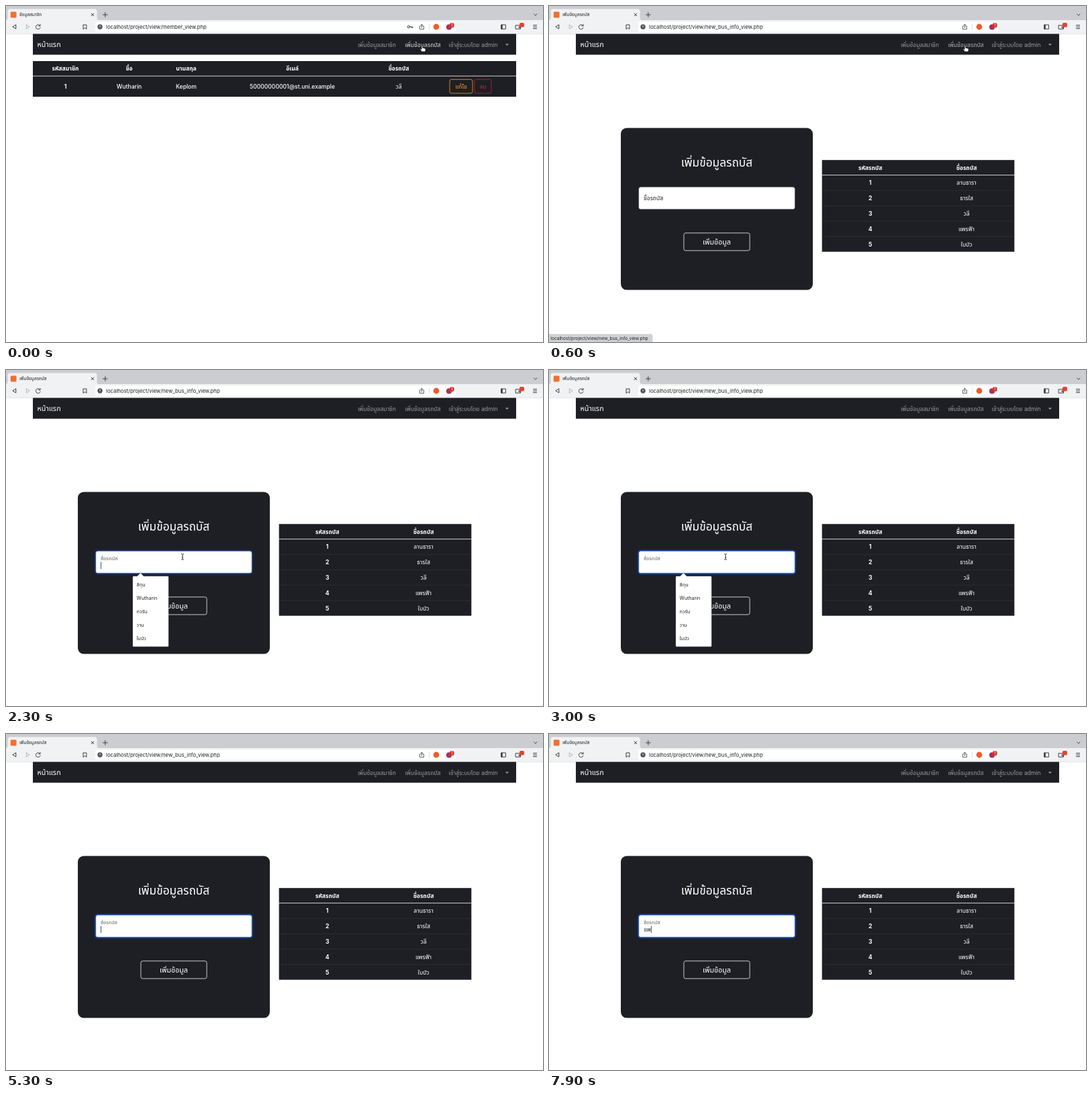
Write an HTML page that moves like this. It is 800 px wide and 500 px high and loops after 8 s.

```html
<!DOCTYPE html>
<html lang="th">
<head>
<meta charset="utf-8">
<style>
html, body { margin: 0; width: 100%; height: 100%; overflow: hidden; background: #fff }
svg { display: block; width: 800px; height: 500px }
text { font: 8.6px Inter, "Noto Sans Thai Looped", "Noto Sans Thai", "Noto Sans", sans-serif; fill: #fff; white-space: pre }
.mid { text-anchor: middle }
.bold { font-weight: 700 }
.medium { font-weight: 500 }
.dark { fill: #212225 }
.small { font-size: 6.6px }
.panel { fill: #1e1f24 }
.icon { fill: none; stroke: #3c3e43; stroke-width: 1; stroke-linecap: round; stroke-linejoin: round }
</style>
</head>
<body>
<svg viewBox="0 0 800 500">
  <defs>
    <linearGradient id="fade"><stop stop-color="#f1f2f4" stop-opacity="0"/><stop offset="1" stop-color="#f1f2f4"/></linearGradient>
  </defs>

  <!-- browser window -->
  <rect width="800" height="21" fill="#cccdd1"/>
  <rect y="21" width="800" height="20.5" fill="#f1f2f4"/>
  <path d="M0 21q2.5 0 2.5-3V8q0-3.5 3.5-3.5H132q3.5 0 3.5 3.5v10q0 3 3 3z" fill="#f1f2f4"/>
  <rect x="133" y="23.5" width="537" height="15" rx="2.5" fill="#fff"/>
  <path d="M0 41.5H800" stroke="#dcdde0" stroke-width=".7"/>
  <rect id="favicon" x="6.8" y="8.6" width="8.8" height="8.8" rx="1.5" fill="#ee7130"/>
  <path id="spinner" class="icon" d="M9 10.2a3.6 3.6 0 0 1 2-.9" opacity=".25"/>
  <text id="title" class="small medium dark" x="20" y="15.2"></text>
  <rect x="108" y="6" width="15" height="14" fill="url(#fade)"/>
  <rect x="123" y="6" width="11" height="14" fill="#f1f2f4"/>
  <g class="icon">
    <path d="M127 11l3.8 3.8m0-3.8l-3.8 3.8M144.5 13h6.6m-3.3-3.3v6.6M786.6 12l2.2 2.2 2.2-2.2"/>
    <path d="M14.8 28.2v5.8l-4.6-2.9z"/>
    <path d="M30.3 28.2v5.8l4.6-2.9z" stroke="#b4b5b9"/>
    <path id="reload" d="M50.6 29.2a3.4 3.4 0 1 0 .5 3M51 27.4v2.3h-2.3"/>
    <path id="stop" d="M45 28l6 6m0-6l-6 6"/>
    <path d="M115.3 28h4.6v6.4l-2.3-1.9-2.3 1.9z"/>
    <g id="key"><circle cx="599.8" cy="31" r="1.7"/><path d="M601.6 31h4.2v1.6m-1.8-1.6v1.2"/></g>
    <path d="M617.8 30h-1.4v4.6h6V30H621M619.4 32.5v-5.2m-1.6 1.5l1.6-1.6 1.6 1.6" stroke-width=".8"/>
    <path d="M630.5 26.5v9" stroke="#cfd0d4" stroke-width=".7"/>
    <path d="M738 28h6.4v6.2H738z"/><path d="M738.8 28.5v5.2" stroke-width="2"/>
    <path d="M759.5 28.8h7v5.4h-7zM764.4 30.8h2.4v1.6h-2.4z"/>
    <path d="M785.6 28.6h5m-5 2.5h5m-5 2.5h5"/>
  </g>
  <circle cx="140" cy="31" r="3.7" fill="#505257"/>
  <path d="M140 29v2.4m0 1.4v.4" stroke="#fff"/>
  <text id="address" class="dark" x="149" y="34" style="font-size:7.75px"></text>
  <circle cx="641" cy="31" r="4.4" fill="#f15a2b"/>
  <circle cx="660" cy="31.4" r="4.1" fill="#a8325f"/>
  <rect x="661" y="25.2" width="6.6" height="6.8" rx="2" fill="#e0342b"/>
  <text x="664.3" y="30.4" class="mid" style="font-size:5px">1</text>
  <rect x="765" y="25" width="7" height="6.6" rx="2" fill="#e8402f"/>

  <!-- navigation -->
  <rect class="panel" x="40" y="41.5" width="720" height="31"/>
  <text class="medium" x="46.5" y="61.2" style="font-size:10.8px">หน้าแรก</text>
  <g fill-opacity=".55">
    <text x="524" y="60.6">เพิ่มข้อมูลสมาชิก</text>
    <text id="busLink" x="594.5" y="60.6">เพิ่มข้อมูลรถบัส</text>
    <text x="659.5" y="60.6">เข้าสู่ระบบโดย admin</text>
    <path d="M743.8 56.2h5.2l-2.6 2.7z" fill="#fff"/>
  </g>

  <g id="members">
    <rect class="panel" x="40" y="82" width="720" height="53"/>
    <path d="M40 104.2H760" stroke="#e4e4e6" stroke-width=".9"/>
    <g id="memberCells"></g>
    <rect x="661" y="109.3" width="34" height="20.6" rx="2.6" fill="none" stroke="#f5a02c" stroke-width=".8"/>
    <text class="mid medium" x="678" y="122.8" style="fill:#f5a02c">แก้ไข</text>
    <rect x="698" y="109.3" width="25" height="20.6" rx="2.6" fill="none" stroke="#a92d3b" stroke-width=".8"/>
    <text class="mid medium" x="710.5" y="122.8" style="fill:#b92f3e">ลบ</text>
  </g>

  <g id="buses">
    <rect class="panel" x="107" y="181.5" width="286" height="241" rx="8.7"/>
    <text class="mid medium" x="250" y="239" style="font-size:17.3px">เพิ่มข้อมูลรถบัส</text>
    <g id="glow">
      <rect x="132.9" y="268.7" width="234.2" height="34.6" rx="3.6" fill="none" stroke="#0d4fd0" stroke-opacity=".55" stroke-width="2.2"/>
    </g>
    <rect id="field" x="134" y="269.8" width="232" height="32.3" rx="2.6" fill="#fff" stroke-width=".7"/>
    <text id="label" class="dark"></text>
    <text id="typed" class="dark" x="141" y="294.2"></text>
    <rect id="caret" y="285.6" width=".8" height="10.4" fill="#222"/>
    <rect x="200.9" y="337.8" width="98.2" height="26.2" rx="2.8" fill="none" stroke="#f4f4f4" stroke-width=".8"/>
    <text class="mid medium" x="250" y="354.9" style="font-size:10.8px">เพิ่มข้อมูล</text>
    <g id="suggestions">
      <path d="M190 307h5.5l4.8-4.8 4.8 4.8H241q1 0 1 1v102.6q0 1-1 1H190q-1 0-1-1V308q0-1 1-1z" fill="#fff" stroke="#c9cace" stroke-width=".4"/>
    </g>
    <rect class="panel" x="406.7" y="229.2" width="286.6" height="136.5"/>
    <path d="M406.7 251.6h286.6" stroke="#e4e4e6" stroke-width=".9"/>
    <g id="busRows"></g>
  </g>

  <g id="status">
    <path d="M0 488.5H151q3 0 3 3V500H0z" fill="#d0d1d4" stroke="#bfc0c4" stroke-width=".5"/>
    <text class="dark" x="2.3" y="496.8" style="font-size:6.65px">localhost/project/view/new_bus_info_view.php</text>
  </g>

  <g id="pointer">
    <path id="hand" d="M-1 0q1-1 1.8 0V3.2l3.4.9q1.2.5 1 1.8L4.6 9H-.6L-3.2 5.4q.3-1.2 2.2.2z" fill="#fff" stroke="#111" stroke-width=".8"/>
    <path id="arrow" d="M0 0V9.2L2.2 7.2 3.6 10.4 5 9.8 3.6 6.7H6.5z" fill="#111" stroke="#fff" stroke-width=".7"/>
    <path id="beam" d="M-1.9-4.3Q0-4.3 0-3.3 0-4.3 1.9-4.3M0-3.3V3.3M-1.9 4.3Q0 4.3 0 3.3 0 4.3 1.9 4.3M-1 .9H1" fill="none" stroke="#222" stroke-width=".9"/>
  </g>
</svg>
<script>
const LOOP = 8000, LOAD = 400, READY = 600, MOVE = 1000, ARRIVE = 1900,
      FOCUS = 2220, HIDE = 5300, KEYS = [7300, 7800];
const FIRST_URL = 'localhost/project/view/member_view.php';
const BUS_URL = 'localhost/project/view/new_bus_info_view.php';
const buses = ['ลานธารา', 'ธารใส', 'วลี', 'แพรฟ้า', 'ใบบัว'];

const $ = id => document.getElementById(id);
const clamp = v => Math.max(0, Math.min(1, v));
const progress = (t, start, length) => clamp((t - start) / length);
const ease = p => p * p * (3 - 2 * p);
const mix = (a, b, p) => a + (b - a) * p;
const show = (id, on) => $(id).style.display = on ? '' : 'none';

function add(parent, tag, attrs, content = '') {
  const el = document.createElementNS('http://www.w3.org/2000/svg', tag);
  for (const name in attrs) el.setAttribute(name, attrs[name]);
  el.textContent = content;
  $(parent).append(el);
}
const cell = (parent, x, y, content, bold) =>
  add(parent, 'text', { x, y, class: bold ? 'mid bold' : 'mid medium' }, content);

[
  [88.5, 'รหัสสมาชิก', '1'], [183.5, 'ชื่อ', 'Wutharin'], [268.5, 'นามสกุล', 'Keplom'],
  [426.5, 'อีเมล์', '50000000001@st.uni.example'], [585, 'ชื่อรถบัส', 'วลี']
].forEach(([x, head, value], i) => {
  cell('memberCells', x, 96, head, true);
  cell('memberCells', x, 122.7, value, i === 0);
});

cell('busRows', 478.7, 243.6, 'รหัสรถบัส', true);
cell('busRows', 622, 243.6, 'ชื่อรถบัส', true);
buses.forEach((name, i) => {
  const y = 266.4 + i * 22.8;
  cell('busRows', 478.7, y, i + 1, true);
  cell('busRows', 622, y, name);
  if (i) add('busRows', 'path', { d: `M406.7 ${y - 14.6}h286.6`, stroke: '#34363b', 'stroke-width': .6 });
});

['ลีดุน', 'Wutharin', 'ทวรัน', 'วาน', 'ใบบัว'].forEach((name, i) =>
  add('suggestions', 'text', { x: 194.6, y: 322.4 + i * 20, class: 'dark', style: 'font-size:7.2px' }, name));

$('label').textContent = 'ชื่อรถบัส';

function drawBrowser(t) {
  const loading = t >= LOAD && t < READY, loaded = t >= READY;
  $('title').textContent = loading ? BUS_URL : loaded ? 'เพิ่มข้อมูลรถบัส' : 'ข้อมูลสมาชิก';
  $('address').textContent = t < LOAD ? FIRST_URL : BUS_URL;
  show('favicon', !loading);
  show('spinner', loading);
  show('reload', !loading);
  show('stop', loading);
  show('key', t < LOAD);
  show('members', !loaded);
  show('buses', loaded);
  show('status', t >= 100 && t < 1200);
}

function drawForm(t) {
  const focus = ease(progress(t, FOCUS, 150)), raise = ease(progress(t, FOCUS, 100));
  $('glow').setAttribute('opacity', focus);
  $('field').setAttribute('stroke', focus ? '#86b7fe' : '#ced4da');
  $('label').setAttribute('transform', `translate(141 ${mix(289.2, 282.8, raise)}) scale(${mix(1, .85, raise)})`);
  $('label').setAttribute('opacity', mix(1, .7, raise));
  show('suggestions', t >= FOCUS && t < HIDE);

  const count = KEYS.filter(k => t >= k).length;
  $('typed').textContent = 'แพ'.slice(0, count);
  const blinkStart = count ? KEYS[count - 1] : FOCUS;
  show('caret', t >= FOCUS && (t - blinkStart) % 1000 < 500);
  $('caret').setAttribute('x', 141.2 + (count ? $('typed').getComputedTextLength() : 0));
}

function drawPointer(t) {
  const p = ease(progress(t, MOVE, ARRIVE - MOVE));
  const x = mix(620, 263, p), y = mix(59, 278, p);
  const onLink = x > 594 && y < 66;
  const onField = x > 134 && x < 366 && y > 270 && y < 302;
  $('pointer').setAttribute('transform', `translate(${x} ${y})`);
  show('pointer', t < HIDE);
  show('hand', onLink);
  show('beam', onField);
  show('arrow', !onLink && !onField);
  const hover = !onLink ? .55 : t < READY ? .85 : mix(.65, .85, progress(t, READY, 150));
  $('busLink').setAttribute('fill-opacity', hover);
}

function frame(now) {
  const t = now % LOOP;
  drawBrowser(t);
  drawForm(t);
  drawPointer(t);
  requestAnimationFrame(frame);
}
requestAnimationFrame(frame);
</script>
</body>
</html>
```
